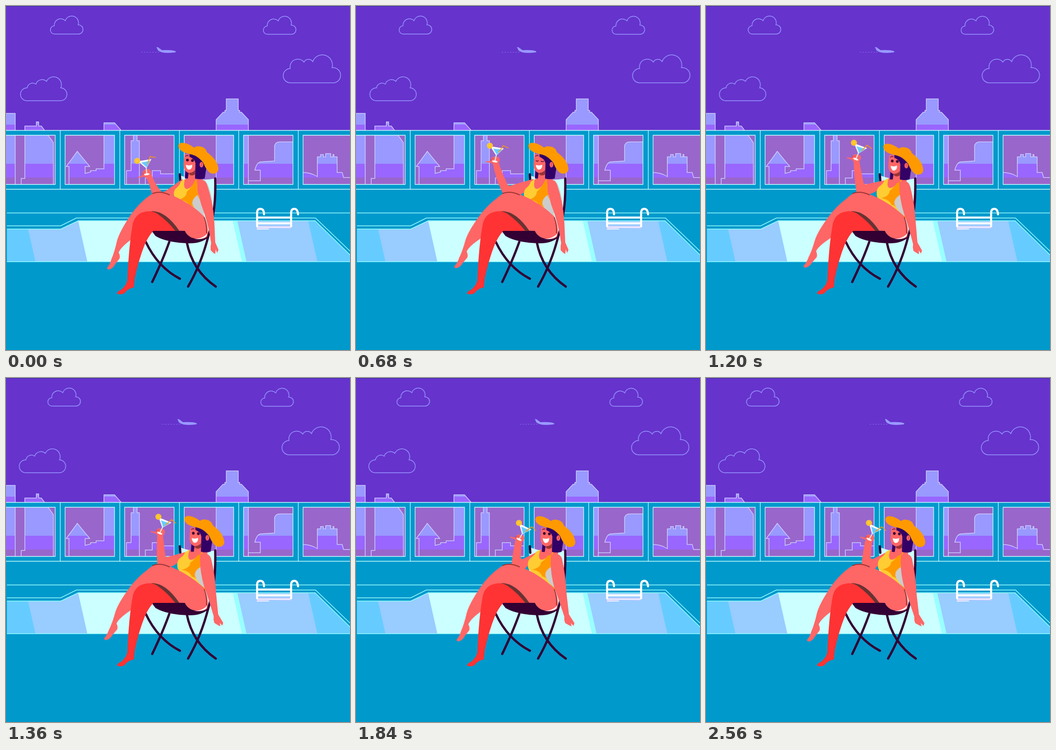
Write an HTML page without scripts that moves like this. It is 748 px wide and 748 px high and loops after 2.6 s.

```html
<!DOCTYPE html>
<html lang="en">
<head>
<meta charset="utf-8">
<title>Rooftop pool</title>
<style>
html, body { margin: 0; width: 100%; height: 100%; overflow: hidden; background: #09c; }
svg { display: block; width: 100vw; height: 100vh; }
.skin { fill: #f66; }
.dark { fill: #303; }
.hair { fill: #306; }
.line { fill: none; stroke: #99f; stroke-width: 1.5; }
.edge { fill: none; stroke: #9ff; stroke-width: 1.5; }
.pole { fill: none; stroke: #303; stroke-width: 5; stroke-linecap: round; }
.rail { fill: none; stroke: #fff; stroke-width: 4.5; stroke-linecap: round; }
.near, .far, .plane, .torso, .head, .arm, .calf, .hand, .forearm, .open, .shut {
  animation: 2600ms linear infinite;
}
.near { animation-name: drift; --shift: -8.5px; }
.far { animation-name: drift; --shift: -4.2px; }
.plane { animation-name: fly; }
.torso { animation-name: lean; transform-origin: 425px 490px; }
.head { animation-name: nod; }
.arm { animation-name: hang; }
.calf { animation-name: swing; transform-origin: 290px 440px; }
.hand { animation-name: raise; }
.forearm { animation-name: bend; }
.open { animation-name: blink; animation-timing-function: step-end; }
.shut { animation-name: lids; animation-timing-function: step-end; }
@keyframes drift { 80%, 100% { transform: translateX(var(--shift)); } }
@keyframes fly { 71%, 100% { transform: translateX(62px); } }
@keyframes lean {
  0%, 28% { transform: rotate(0deg); }
  46.15% { transform: rotate(4.2deg); }
  58.46%, 100% { transform: rotate(6deg); }
}
@keyframes nod {
  0%, 28% { transform: translate(0, 0); }
  46.15% { transform: translate(10.5px, 2px); }
  58.46%, 100% { transform: translate(15px, 3px); }
}
@keyframes hang {
  0%, 28% { d: path("M415 379Q433 374 438 391Q451 430 453 470L455 514L462 530L459 537L456 529L455 539L451 537L445 531L445 522L446 515Q442 485 431 450Q417 415 415 379Z"); }
  58.46%, 100% { d: path("M424 385Q443 378 448 393Q456 430 458 470L463 514L475 533L473 539L467 533L469 540L464 538L455 533L453 527L453 519Q443 488 431 455Q421 417 424 385Z"); }
}
@keyframes swing {
  0% { transform: rotate(0deg); }
  13.85% { transform: rotate(1.2deg); }
  26.15% { transform: rotate(2.6deg); }
  37%, 46.15% { transform: rotate(3.4deg); }
  58.46% { transform: rotate(2.2deg); }
  70.77% { transform: rotate(.4deg); }
  76%, 100% { transform: rotate(0deg); }
}
@keyframes raise {
  0% { transform: translate(306px, 365px) rotate(-9deg); }
  13.85% { transform: translate(301px, 341px) rotate(2deg); }
  26.15% { transform: translate(302px, 337px) rotate(9deg); }
  46.15% { transform: translate(326px, 332px) rotate(20deg); }
  58.46% { transform: translate(343px, 341px) rotate(24deg); }
  70.77%, 100% { transform: translate(355px, 350px) rotate(26deg); }
}
@keyframes bend {
  0% { d: path("M304 372Q312 385 317 408L330 420L365 412L385 392L384 376L346 403L339 405Q322 385 315 363Z"); }
  13.85% { d: path("M295 346Q303 380 318 405L335 418L360 409L385 392L386 376L334 391L330 389Q315 365 307 342Z"); }
  26.15% { d: path("M297 340Q304 378 318 405L335 418L360 409L385 392L386 376L334 391L330 389Q318 365 309 337Z"); }
  46.15% { d: path("M321 336Q322 375 327 404L340 415L362 407L385 395L388 379L347 388L343 386Q338 365 333 335Z"); }
  58.46% { d: path("M337 345Q331 375 331 405L345 415L365 410L380 397L392 378L353 391L350 389Q350 368 349 343Z"); }
  70.77%, 100% { d: path("M346 354Q341 380 338 405L348 415L368 414L382 400L396 377L362 394L358 392Q359 375 361 352Z"); }
}
@keyframes blink { 0% { opacity: 1; } 21.54% { opacity: 0; } 32.3%, 100% { opacity: 1; } }
@keyframes lids { 0% { opacity: 0; } 21.54% { opacity: 1; } 32.3%, 100% { opacity: 0; } }
</style>
</head>
<body>
<svg viewBox="0 0 748 748">
  <defs>
    <linearGradient id="haze" gradientUnits="userSpaceOnUse" x1="0" y1="200" x2="0" y2="400">
      <stop offset=".29" stop-color="#99f"/><stop offset=".29" stop-color="#96f"/>
      <stop offset=".35" stop-color="#96f"/><stop offset=".35" stop-color="#99f"/>
      <stop offset=".715" stop-color="#99f"/><stop offset=".715" stop-color="#96f"/>
      <stop offset=".867" stop-color="#96f"/><stop offset=".867" stop-color="#96c"/>
    </linearGradient>
    <path id="panes" d="M-2 281H107V388H-2ZM128.5 281H236V388H128.5ZM258 281H365.5V388H258ZM387.5 281H495V388H387.5ZM516.5 281H624V388H516.5ZM646 281H750V388H646Z"/>
    <clipPath id="view"><path d="M0 0H748V270H0Z"/><use href="#panes"/></clipPath>
    <path id="cloud" d="M106 61A9 9 0 0 1 105 43A14 14 0 0 1 129 32A14.7 14.7 0 0 1 157 41A10 10 0 0 1 158 61Z"/>
  </defs>

  <rect width="748" height="271" fill="#63c"/>
  <rect width="748" height="1" fill="#339"/>
  <g class="near line">
    <use href="#cloud"/>
    <use href="#cloud" x="463" y=".5"/>
  </g>
  <g class="far line">
    <path d="M45 206A14 14 0 0 1 46 178A12 12 0 0 1 65 170A14 14 0 0 1 88 164A17 17 0 0 1 119 178A14 14 0 0 1 118 206Z"/>
    <path d="M618.500 167A15.500 15.500 0 0 1 618 136A17 17 0 0 1 648 122A11 11 0 0 1 667 121A22 22 0 0 1 709 134A16.700 16.700 0 0 1 714 167Z"/>
  </g>
  <g class="plane">
    <path d="M327 89L331 90L339 96Q360 95 368 98Q371 100 367 101Q350 103 340 101Q333 99 330 96Z" fill="#99f"/>
    <path class="line" d="M294 100.5H333" style="stroke-width:1;stroke-dasharray:3 3;opacity:.6"/>
  </g>

  <!-- terrace and skyline -->
  <rect y="270" width="748" height="478" fill="#09c"/>
  <use href="#panes" fill="#96c"/>
  <g clip-path="url(#view)" fill="url(#haze)" stroke="#ccf" stroke-width="1.5">
    <path d="M-3 390V233.500H20V390Z"/>
    <path d="M33 390V375H41V261H66V252H71V261H77L103 297V390Z"/>
    <path d="M137 390V349H131L155 316L182 349H172V364L184 361V358H196V354H213V254H236L250 270V390Z"/>
    <path d="M262 390V358H272V293H277V272H285V293H290V390Z"/>
    <path d="M303 390V374H318V358H336V365H370V390Z"/>
    <path d="M457 390V247L472 231H476V227H479V202H505V227H508V231H512L527 247V390Z"/>
    <path d="M527 390V380H553V357H541Q545 341 553 339L584 337V303Q587 295 596 295.500H630V390Z"/>
    <path d="M640 390V362Q662 361 677 371V328H684V323H690V328H695V321H706V328H711V323H713V328H720V362H731L734 373H752V390Z"/>
  </g>
  <g fill="none" stroke="#cff" stroke-width="1.3">
    <use href="#panes"/>
    <path d="M0 270.500H748M0 398.500H748M118 270V398M247.500 270V398M377 270V398M506 270V398M635.500 270V398"/>
  </g>

  <!-- pool -->
  <path d="M2 485H119L157 467H672L748 541V556H2Z" fill="#6cf"/>
  <path d="M48 485H119L157 467H657L677 556H64Z" fill="#9cf"/>
  <path d="M157 467H503L523 556H177Z" fill="#9ff"/>
  <path d="M157 467H493L513 556H177Z" fill="#cff"/>
  <path class="edge" d="M2 450H748M2 478H119L153 461H673L748 533M2 485H119L157 467H672L748 541M2 556H748"/>
  <path d="M545 478H620V484L575 483L545 487Z" fill="#ccf"/>
  <path class="rail" d="M546 479V450Q546 441 553 441Q561 441 561 453M620 479V450Q620 441 627 441Q634 441 635 453M546 460H620M546 472.500H620"/>
  <path d="M546 481H618M546 485H572" stroke="#fff" stroke-width="1.5"/>

  <!-- chair -->
  <path d="M378 368Q415 383 455 375Q456 430 449 452L438 505H400L376 425Z" fill="#cff"/>
  <path d="M432 378Q447 395 451 450H400V400Z" fill="#ccc"/>
  <path class="pole" d="M378 366L379 380M455 375Q456 420 451 450Q446 480 440 500Q425 560 396 610M355 513Q342 550 318 600M304 513Q330 568 378 593M393 513Q405 575 456 610"/>
  <path class="dark" d="M316 488L400 484L440 496V503Q425 516 400 516Q350 515 325 500Z"/>

  <!-- raised arm with glass -->
  <path class="skin forearm" d="M304 372Q312 385 317 408L330 420L365 412L385 392L384 376L346 403L339 405Q322 385 315 363Z"/>
  <g class="hand">
    <path class="skin" d="M-20 4L-8 1Q-11 -5 -4 -9L6 -10Q12 -6 9 2L6 9Q-2 8 -8 5L-19 6Z"/>
    <path d="M-9 1Q-8 -5 -3 -5" fill="none" stroke="#c33"/>
    <path d="M-15 -30H15L1 -12Z" fill="#fff"/>
    <path d="M-8 -26L12 -27L2 -14Z" fill="#6cf"/>
    <path d="M1 -14L0 0" stroke="#cff" stroke-width="2"/>
    <ellipse cy="1" rx="6" ry="2" fill="#fff"/>
    <circle cx="-16" cy="-31" r="6.500" fill="#fc3"/>
    <circle cx="-16" cy="-31" r="4" fill="none" stroke="#f90" opacity=".5"/>
    <path d="M5 -20L13 -36L25 -32" fill="none" stroke="#f90" stroke-width="1.800"/>
  </g>

  <g class="torso">
    <path class="skin" d="M381 382L394 374L428 377L430 410L413 412L385 410L376 392Z"/>
    <path d="M380 382L389 376Q384 397 393 398Q405 396 412 378L417 378Q414 398 418 410L432 462L400 450L367 420Q362 405 369 397Q378 390 380 382Z" fill="#fc3"/>
    <path d="M412 378L417 378Q413 398 418 410L432 462L420 452Q412 435 399 434Q394 423 376 421Q393 416 393 404Q404 395 412 378Z" fill="#f90"/>
    <path d="M416 411Q402 422 406 433Q414 448 430 457V440Z" fill="#ccc"/>
  </g>

  <g class="head">
    <path class="hair" d="M391 352H408V376L389 375Z"/>
    <path class="skin" d="M398 358H412V378Q403 388 395 378Z"/>
    <path d="M398 362L411 356V366Q404 371 398 366Z" fill="#933"/>
    <path class="skin" d="M388 322L420 326L416 350Q408 364 397 363Q387 360 386 345Z"/>
    <path class="hair" d="M399 320L432 334L436 350L432 375Q421 378 411 375L412 342Q410 332 399 328Z"/>
    <ellipse class="skin" cx="425" cy="345" rx="4" ry="6"/>
    <path d="M425 341Q427 345 424 348" fill="none" stroke="#c33"/>
    <path d="M391 345.500Q398 348 405 345Q405 356 397 356Q392 354 391 345.500Z" fill="#fff"/>
    <path d="M390 327Q393 324 397 326M402 327Q407 326 410 329" fill="none" stroke="#306" stroke-width="1.200"/>
    <g class="open dark"><circle cx="394.500" cy="335" r="2.900"/><circle cx="405.500" cy="336" r="3"/></g>
    <path class="shut" d="M391 336Q394 339 397 336M402 337Q405 340 409 337" fill="none" stroke="#303" stroke-width="1.300" opacity="0"/>
    <path d="M375 303C377 294 394 296 409 308Q414 303 425 306Q434 308 437 318Q461 335 462 355Q460 367 446 364Q436 359 429 341Q416 324 399 322Q374 316 375 303Z" fill="#f90"/>
  </g>

  <!-- legs -->
  <path class="skin calf" d="M320 407Q292 424 270 456Q246 492 241 512Q236 535 229 551Q226 562 220 569Q219 573 224 573Q233 571 237 562L247 549Q249 544 245 536Q249 525 273 507L325 450Z"/>
  <path class="skin" d="M300 426Q315 406 332 404Q350 405 375 418Q410 436 431 458Q443 485 437 502Q425 511 402 503Q392 497 389 489L340 488L290 455Z"/>
  <path d="M318 408Q335 401 356 411" fill="none" stroke="#933" stroke-width="2"/>
  <path d="M431 459Q437 475 436 494" fill="none" stroke="#933" stroke-width="2"/>
  <path d="M437 495Q438 508 408 507Q428 506 437 495Z" fill="#fff"/>
  <path d="M316 446Q347 445 377 489H362Z" fill="#633"/>
  <path d="M276 472Q282 452 300 448Q318 443 331 453Q352 468 368 489H320Q309 502 302 518Q289 550 280 592L278 612Q265 614 257 625Q248 629 241 625Q243 620 252 616Q264 604 264 594Q267 520 276 472Z" fill="#f33"/>

  <path class="skin arm" d="M415 379Q433 374 438 391Q451 430 453 470L455 514L462 530L459 537L456 529L455 539L451 537L445 531L445 522L446 515Q442 485 431 450Q417 415 415 379Z"/>
</svg>
</body>
</html>
```
